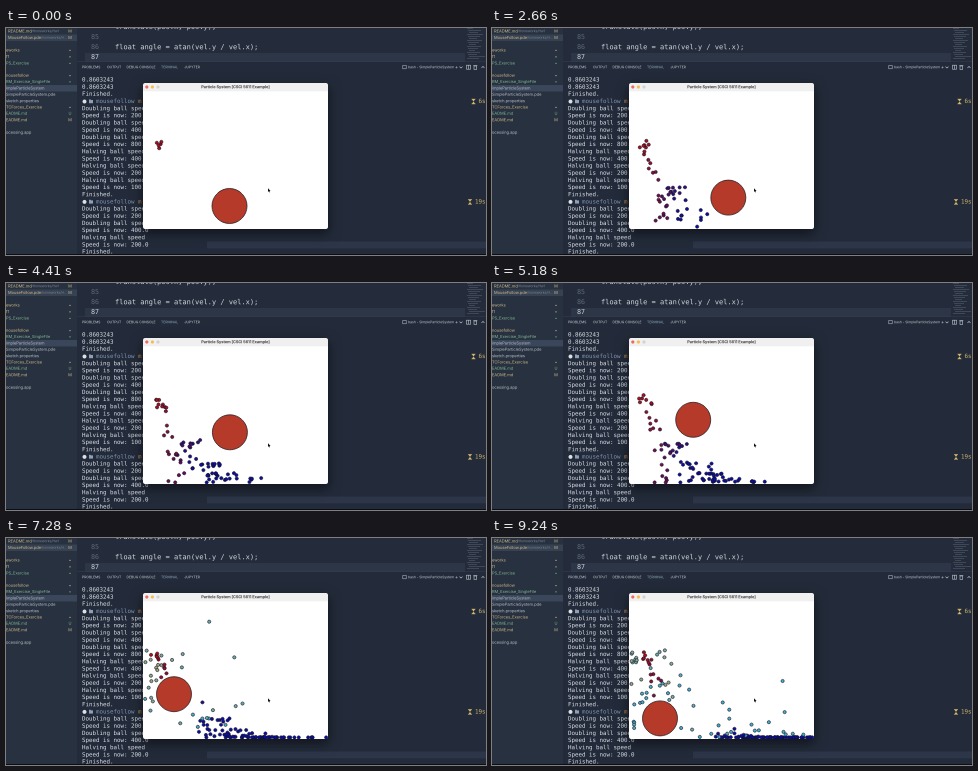
Animation of 480 by 227 pixels, one loop 9.31 s. Source, as an HTML page with a canvas:

```html
<!DOCTYPE html>
<html lang="en">
<head>
<meta charset="utf-8">
<title>Particle System</title>
<style>
  html, body { margin: 0; width: 100%; height: 100%; overflow: hidden; background: #232b3a; }
  canvas { display: block; width: 480px; height: 227px; }
</style>
</head>
<body>
<canvas id="stage"></canvas>
<script>
const W = 480, H = 227, STEP = 70, FRAMES = 133;
const MONO = '"DejaVu Sans Mono", monospace', SANS = 'Inter, sans-serif';
const ratio = window.devicePixelRatio || 1, FINE = 4 * ratio;

function prepare(canvas, scale) {
  canvas.width = W * scale;
  canvas.height = H * scale;
  const c = canvas.getContext('2d');
  c.scale(scale, scale);
  return c;
}
const stage = prepare(document.getElementById('stage'), ratio);
stage.imageSmoothingQuality = 'high';

// Fine backdrop, scaled down once so that small type keeps its proportions
const fine = document.createElement('canvas');
const g = prepare(fine, FINE);

function rect(x, y, w, h, fill) {
  g.fillStyle = fill;
  g.fillRect(x, y, w, h);
}
function dot(c, x, y, r, fill, line, width) {
  c.beginPath();
  c.arc(x, y, r, 0, Math.PI * 2);
  c.fillStyle = fill;
  c.fill();
  if (line) {
    c.strokeStyle = line;
    c.lineWidth = width;
    c.stroke();
  }
}
function label(text, x, y, size, fill, family = SANS, align = 'left', weight = 400) {
  g.font = `${weight} ${size}px ${family}`;
  g.textAlign = align;
  g.textBaseline = 'middle';
  g.fillStyle = fill;
  g.fillText(text, x, y);
}
function path(points, color, width = 0.6) {
  g.beginPath();
  points.forEach(([x, y], i) => i ? g.lineTo(x, y) : g.moveTo(x, y));
  g.strokeStyle = color;
  g.lineWidth = width;
  g.stroke();
}

function drawSidebar() {
  const plain = '#bcc3cd', changed = '#d0bb8c', fresh = '#82b795';
  rect(0, 0, 71, H, '#28313f');
  rect(0, 6.5, 71, 6.5, '#364152');
  rect(0, 57, 71, 6.5, '#3a465a');
  const rows = [
    ['README.md', 2, 3.2, changed, 'M'], ['MouseFollow.pde', 2, 9.8, changed, 'M'],
    ['eworks', 0, 22.2, changed, '•'], ['f1', 0, 28.8, changed, '•'],
    ['PS_Exercise', 0, 35.2, fresh, '•'], ['nousefollow', 0, 47.6, changed, '•'],
    ['RM_Exercise_SingleFile', 0, 53.8, fresh, '•'], ['impleParticleSystem', 0, 60.2, plain, ''],
    ['SimpleParticleSystem.pde', 0, 66.6, plain, ''], ['sketch.properties', 0, 73, plain, ''],
    ['TCForces_Exercise', 0, 79.2, changed, '•'], ['EADME.md', 0, 85.6, fresh, 'U'],
    ['EADME.md', 0, 92, changed, 'M'], ['ocessing.app', 0, 104.6, plain, '']
  ];
  for (const [name, x, y, color, mark] of rows) {
    label(name, x, y, 4, color);
    label(mark, 64, y, 4, color, SANS, 'center');
  }
  label('/Homeworks/Hw1', 25.5, 3.2, 3.3, '#7b8796');
  label('/homeworks/H...', 35, 9.8, 3.3, '#7b8796');
}

function drawEditor() {
  rect(71, 0, W - 71, 34, '#242c3b');
  rect(79, 25, 380, 8.5, '#2c3647');
  label('translate(pos.x, pos.y);', 109, -0.8, 7, '#c4cad3', MONO);
  label('float angle = atan(vel.y / vel.x);', 109, 19.4, 7, '#d2d7df', MONO);
  ['85', '86', '87'].forEach((n, i) =>
    label(n, 93, 9.4 + i * 10, 6.6, i === 2 ? '#d2d7df' : '#5e6a7b', MONO, 'right'));
  for (let i = 0; i < 16; i++) {
    rect(461 + i % 3, i * 2, 6 + (i * 7) % 11, 0.7, 'rgba(165,178,196,.3)');
  }
  rect(71, 33.6, W - 71, 0.6, '#394456');
}

function drawPanelBar() {
  const tabs = [['PROBLEMS', 76], ['OUTPUT', 101], ['DEBUG CONSOLE', 120.5],
    ['TERMINAL', 155], ['JUPYTER', 178.5]];
  for (const [name, x] of tabs) {
    label(name, x, 39.3, 3.4, name === 'TERMINAL' ? '#8fa9bc' : '#d0d6de');
  }
  const ink = '#c2c9d3';
  g.strokeStyle = ink;
  g.lineWidth = 0.5;
  g.strokeRect(396.8, 37.4, 3.4, 3.4);
  label('bash - SimpleParticleSystem', 402, 39.3, 3.4, ink);
  label('+', 450.5, 39.2, 5, ink, SANS, 'center');
  path([[453.5, 38.6], [455, 40], [456.5, 38.6]], ink);
  g.strokeRect(460.5, 37.2, 4, 4);
  path([[462.5, 37.2], [462.5, 41.2]], ink);
  path([[467.3, 37.6], [471.3, 37.6]], ink);
  g.strokeRect(468, 38, 2.6, 3.4);
  path([[475.5, 40], [477, 38.4], [478.5, 40]], ink);
}

function drawHourglass(x, y, color) {
  g.beginPath();
  g.moveTo(x - 1.8, y - 2.4);
  g.lineTo(x + 1.8, y - 2.4);
  g.lineTo(x - 1.8, y + 2.4);
  g.lineTo(x + 1.8, y + 2.4);
  g.closePath();
  g.fillStyle = color;
  g.fill();
  path([[x - 2, y - 2.4], [x + 2, y - 2.4]], color);
  path([[x - 2, y + 2.4], [x + 2, y + 2.4]], color);
}

function drawPrompt(y, time) {
  dot(g, 78.5, y, 2, '#dce1e8');
  rect(83, y - 1.5, 4, 3.2, '#8ca0b8');
  rect(83, y - 2.1, 1.8, 1, '#8ca0b8');
  label('mousefollow', 90, y, 5.82, '#8297b2', MONO);
  label('m', 132, y, 5.82, '#c58b50', MONO);
  const gold = '#d3b86d', right = 479.5;
  label(time, right, y, 5.82, gold, MONO, 'right');
  drawHourglass(right - time.length * 3.5 - 5, y, gold);
}

function drawTerminal() {
  rect(71, 34, W - 71, H - 34, '#232b3a');
  rect(201, 213.5, W - 201, 6.8, '#2c3648');
  const speed = n => `Speed is now: ${n}.0`;
  const up = 'Doubling ball speed', down = 'Halving ball speed';
  const lines = ['0.8603243', '0.8603243', 'Finished.', '>6s',
    up, speed(200), up, speed(400), up, speed(800),
    down, speed(400), down, speed(200), down, speed(100), 'Finished.', '>19s',
    up, speed(200), up, speed(400), down, speed(200), 'Finished.'];
  lines.forEach((line, i) => {
    const y = 52 + i * 7.17;
    if (line[0] === '>') drawPrompt(y, line.slice(1));
    else label(line, 76, y, 5.82, '#dce1e8', MONO);
  });
  drawPanelBar();
}

function drawWindow() {
  g.save();
  g.shadowColor = 'rgba(0,0,0,.55)';
  g.shadowBlur = 12 * FINE;
  g.shadowOffsetY = 4 * FINE;
  g.beginPath();
  g.roundRect(137, 55, 185, 146, 2.2);
  g.fillStyle = '#fff';
  g.fill();
  g.restore();
  g.beginPath();
  g.roundRect(137, 55, 185, 8.3, [2.2, 2.2, 0, 0]);
  g.fillStyle = '#f1f0f1';
  g.fill();
  ['#ee6a5f', '#f5bd4f', '#d2d2d2'].forEach((color, i) => dot(g, 140.8 + i * 5.6, 59, 1.6, color));
  label('Particle System [CSCI 5611 Example]', 229.5, 59.1, 3.85, '#3d3d3f', SANS, 'center', 700);
}

// Ball route: time in ms, x, y
const route = [
  [0, 223.5, 178], [1610, 225.3, 178], [3640, 246.6, 161.8],
  [5180, 201.2, 136.8], [6370, 168, 142.8], [7280, 168, 156.2], [9240, 168, 180.4], [9310, 168, 180.4]
];
function ballAt(t) {
  t = Math.max(0, Math.min(t, 9309));
  const i = route.findIndex(p => p[0] > t);
  const [t0, x0, y0] = route[i - 1], [t1, x1, y1] = route[i];
  const k = (t - t0) / (t1 - t0);
  return { x: x0 + (x1 - x0) * k, y: y0 + (y1 - y0) * k,
    vx: (x1 - x0) / (t1 - t0) * 1000, vy: (y1 - y0) / (t1 - t0) * 1000 };
}

let seed = 5611;
function random(a, b) {
  seed = (seed * 1664525 + 1013904223) % 4294967296;
  return a + (b - a) * seed / 4294967296;
}

const BALL = 17.5, DOT = 1.6, GRAVITY = 150, BOUNCE = 0.7, KICK = 1.3, RATE = 60;
const LEFT = 138.8, RIGHT = 320.3, FLOOR = 199.4;

function spawn() {
  const a = random(0, Math.PI * 2), r = 4 * Math.sqrt(random(0, 1));
  return { x: 148.5 + r * Math.cos(a), y: 117 + r * Math.sin(a),
    vx: random(13, 24), vy: random(-26, 2), age: 0, hit: false };
}

function hitBall(p, ball) {
  const dx = p.x - ball.x, dy = p.y - ball.y;
  const d = Math.hypot(dx, dy), reach = BALL + DOT;
  if (d >= reach) return;
  const nx = dx / d, ny = dy / d;
  p.x = ball.x + nx * reach;
  p.y = ball.y + ny * reach;
  const vn = (p.vx - ball.vx) * nx + (p.vy - ball.vy) * ny;
  if (vn < 0) {
    p.vx -= (1 + KICK) * vn * nx;
    p.vy -= (1 + KICK) * vn * ny;
  }
  p.hit = true;
}

function advance(p, ball, dt) {
  p.age += dt;
  p.vy += GRAVITY * dt;
  p.x += p.vx * dt;
  p.y += p.vy * dt;
  hitBall(p, ball);
  if (p.y > FLOOR) { p.y = FLOOR; p.vy = -Math.abs(p.vy) * BOUNCE; }
  if (p.x < LEFT) { p.x = LEFT; p.vx = Math.abs(p.vx) * BOUNCE; }
  if (p.x > RIGHT) { p.x = RIGHT; p.vx = -Math.abs(p.vx) * BOUNCE; }
}

function simulate() {
  const list = [], shots = [];
  for (let t = -300; t < FRAMES * STEP; t += 10) {
    if (t >= 0 && t % STEP === 0) shots.push(list.map(p => ({ ...p })));
    if (t % RATE === 0) list.push(spawn());
    const ball = ballAt(t);
    for (const p of list) advance(p, ball, 0.01);
  }
  return shots;
}

function tint(p) {
  const k = Math.min(1, p.age / 2.6);
  const [from, to] = p.hit ? [[200, 165, 95], [65, 175, 210]] : [[185, 14, 22], [8, 14, 170]];
  return `rgb(${from.map((v, i) => Math.round(v + (to[i] - v) * k))})`;
}

function drawCursor(c, x, y) {
  c.beginPath();
  c.moveTo(x, y);
  for (const [dx, dy] of [[0, 3.6], [0.9, 2.9], [1.5, 4.2], [2, 4], [1.5, 2.7], [2.6, 2.6]]) {
    c.lineTo(x + dx, y + dy);
  }
  c.closePath();
  c.fillStyle = '#111';
  c.fill();
}

drawEditor();
drawTerminal();
drawSidebar();
rect(0, 226, W, 1, '#0b0e14');
drawWindow();
const backdrop = document.createElement('canvas');
const soft = prepare(backdrop, ratio);
soft.imageSmoothingQuality = 'high';
soft.drawImage(fine, 0, 0, W, H);
const shots = simulate();

function paint(now) {
  const frame = Math.floor(now / STEP) % FRAMES;
  stage.drawImage(backdrop, 0, 0, W, H);
  stage.save();
  stage.beginPath();
  stage.rect(137, 63.3, 185, 137.7);
  stage.clip();
  for (const p of shots[frame]) dot(stage, p.x, p.y, DOT, tint(p), '#17121c', 0.6);
  const ball = ballAt(frame * STEP);
  dot(stage, ball.x, ball.y, BALL, '#b63a29', '#2b2024', 0.8);
  drawCursor(stage, 262, 160.3);
  stage.restore();
}

const start = performance.now();
function loop() {
  paint(performance.now() - start);
  requestAnimationFrame(loop);
}
loop();
</script>
</body>
</html>
```
